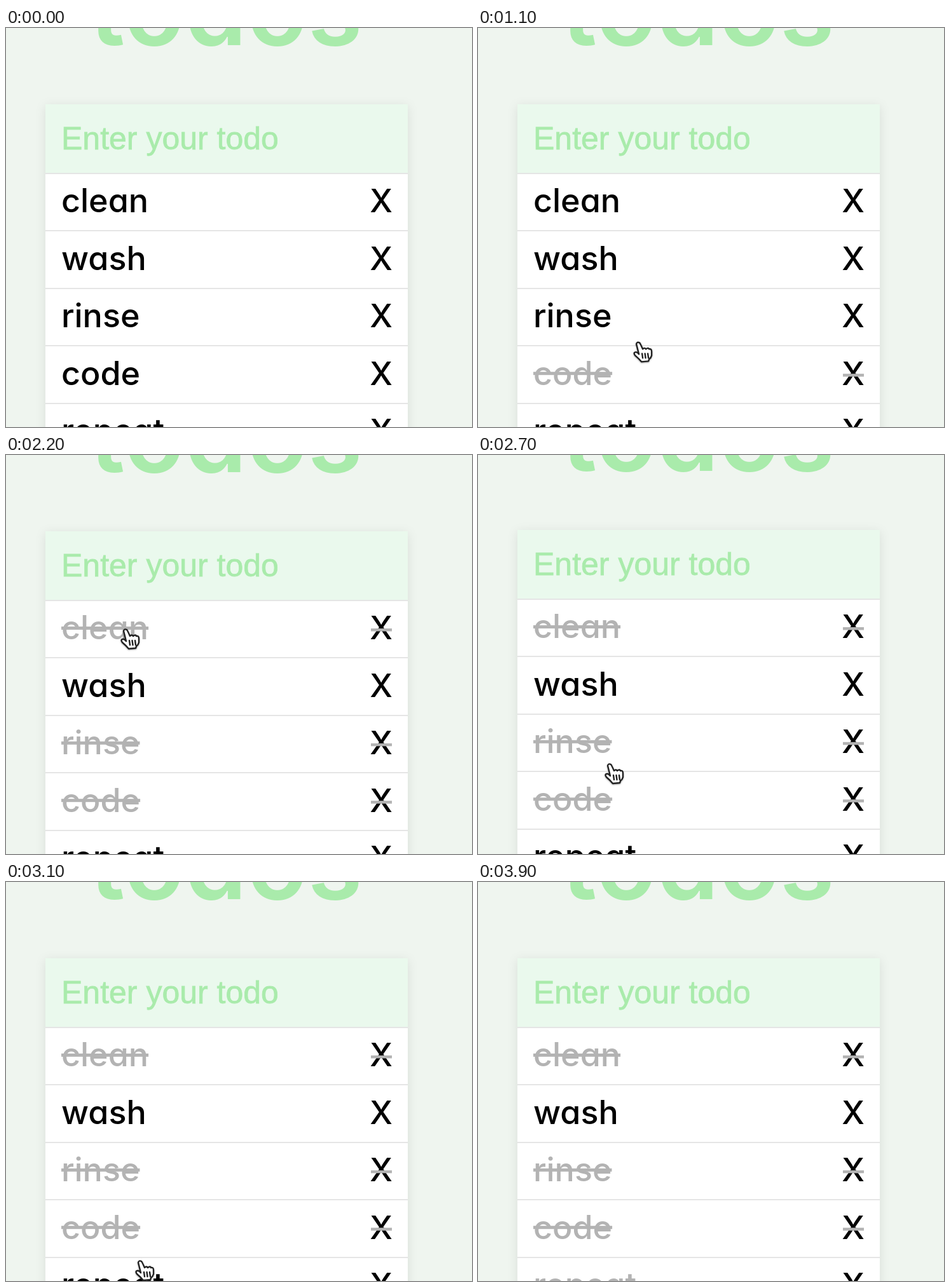
These frames come from a looping animation (733x628 px, 4000 ms). An HTML page:

```html
<!DOCTYPE html>
<html lang="en">
<head>
<meta charset="utf-8">
<title>Todos</title>
<style>
  html, body { margin: 0; width: 100%; height: 100%; overflow: hidden; background: #eff5ef; }
  svg { display: block; width: 733px; height: 628px; }
  text { font-family: Inter, sans-serif; font-feature-settings: "cv11"; }
  .title { font-size: 157px; font-weight: 600; fill: #a9ebab; }
  .hint { font: 50px "Liberation Sans", Arial, sans-serif; fill: #a9ebab; stroke: #a9ebab; stroke-width: .8px; }
  .card { fill: #fff; filter: drop-shadow(0 3px 8px rgba(0, 0, 0, .09)); }
  .row text { font-size: 51px; font-weight: 450; }
  .row .label { font-size: 52px; }
  .strike { fill: #b3b3b3; visibility: hidden; }
  .done .strike { visibility: visible; }
  .done .label { fill: #b3b3b3; }
  #hand { filter: drop-shadow(0 1px 1px rgba(0, 0, 0, .35)); }
</style>
</head>
<body>
<svg viewBox="0 0 733 628">
  <g id="page">
    <text class="title" x="131.5" y="27">todos</text>
    <rect class="card" x="62" y="120" width="570" height="562"/>
    <rect x="62" y="120" width="570" height="108" fill="#eaf9ed"/>
    <text class="hint" x="87" y="191">Enter your todo</text>
  </g>
  <g id="hand" stroke="#222" stroke-width="2.4" stroke-linejoin="round" stroke-linecap="round">
    <path fill="#fff" d="M5 4Q6 0 10 2Q11 3 15 12Q18 9 20 12Q24 9 25 12Q29 11 29 16L29 22Q28 26 25 28L24 31L13 32Q9 27 3 22Q0 18 3 17Q6 16 9 20Z"/>
    <path fill="none" d="M14 19l1 7M18.5 19l1 7M23 19l1 7"/>
  </g>
</svg>
<script>
const LOOP = 4000, STEP = 100, ROW = 90.4;
const page = document.getElementById("page");
const hand = document.getElementById("hand");

// time at which each item is ticked off
const doneTimes = { clean: 2000, wash: Infinity, rinse: 1400, code: 400, repeat: 3400 };

// pointer stops: time, x, y
const stops = [
  [0, 205, 660], [600, 164, 533], [800, 135, 556], [1500, 297, 463],
  [1800, 240, 301], [2200, 180, 273], [2700, 199, 485], [3100, 203, 595],
  [3600, 226, 594], [3700, 290, 554], [3900, 400, 660], [LOOP, 400, 660],
];

const rows = Object.entries(doneTimes).map(([label, doneAt], i) => {
  const row = document.createElementNS("http://www.w3.org/2000/svg", "g");
  const top = Math.round(228 + i * ROW), base = 290.3 + i * ROW;
  row.setAttribute("class", "row");
  row.innerHTML = `
    <rect x="62" y="${top}" width="570" height="2" fill="#e5e5e5"/>
    <text class="label" x="87" y="${base}">${label}</text>
    <text x="608" y="${base}" text-anchor="end">X</text>
    <rect class="strike" x="87" y="${base - 20.3}" height="5"/>
    <rect class="strike" x="574" y="${base - 17.3}" width="33" height="4.5"/>`;
  page.append(row);
  const width = row.querySelector(".label").getComputedTextLength();
  row.querySelector(".strike").setAttribute("width", width);
  return { row, doneAt };
});

// The pointer slows down as it nears each stop.
function pointerAt(t) {
  const i = stops.findIndex(stop => stop[0] > t);
  const [t0, x0, y0] = stops[i - 1], [t1, x1, y1] = stops[i];
  const k = 1 - ((t1 - t) / (t1 - t0)) ** 2;
  return [x0 + (x1 - x0) * k, y0 + (y1 - y0) * k];
}

function draw() {
  const t = Math.floor(performance.now() % LOOP / STEP) * STEP;
  const scroll = t >= 2600 && t < 3100 ? -2 : 0;
  page.setAttribute("transform", `translate(0 ${scroll})`);
  hand.setAttribute("transform", `translate(${pointerAt(t)})`);
  for (const { row, doneAt } of rows) row.classList.toggle("done", t >= doneAt);
  requestAnimationFrame(draw);
}
draw();
</script>
</body>
</html>
```
